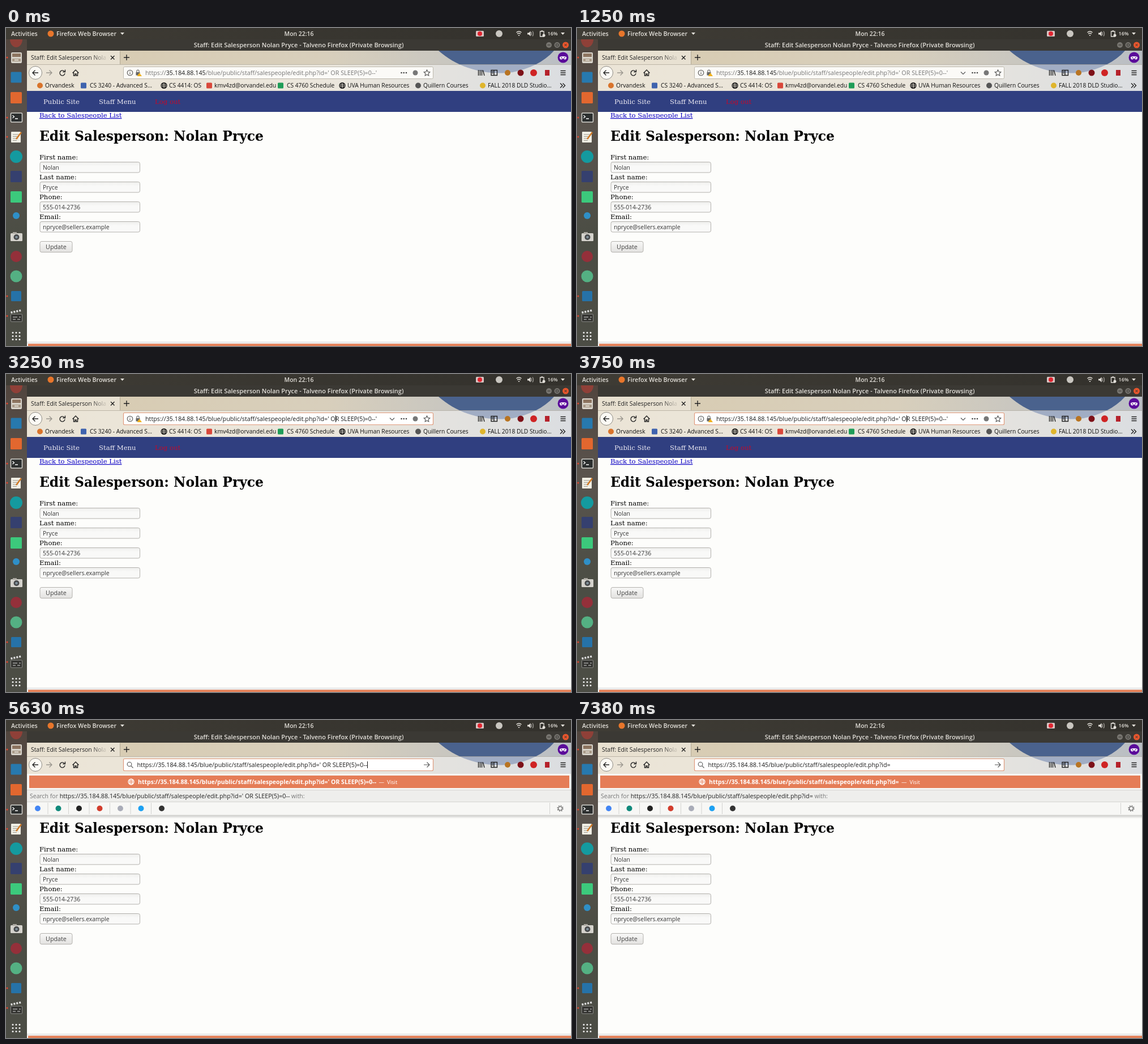
Recreate the animation shown at these times as an HTML page. Size 998x561 px, loop 8 s.

```html
<!DOCTYPE html>
<html lang="en">
<head>
<meta charset="utf-8">
<title>Edit Salesperson</title>
<style>
html, body { margin: 0; width: 100%; height: 100%; overflow: hidden; background: #fdfdfb; }
svg { display: block; width: 100vw; height: 100vh; }
text { white-space: pre; }
.ui { font: 10.75px "Open Sans", "Noto Sans", sans-serif; fill: #1c1c1c; }
.ui .bar { font-weight: 600; font-size: 10.7px; fill: #e3e0da; }
.ui .mark { font-size: 10.25px; fill: #111; }
.ui .field { font-size: 10.4px; fill: #333; }
.page { font: 11.69px "DejaVu Serif", "Noto Serif", serif; fill: #000; }
.page .head { font-size: 23.4px; font-weight: bold; }
.line { fill: none; stroke: #222; stroke-width: 1.4; }
.thin { fill: none; stroke: #555; stroke-width: 1.1; }
.dim { fill: #767676; }
</style>
</head>
<body>
<svg viewBox="0 0 998 561" preserveAspectRatio="none">
  <defs>
    <linearGradient id="dockFill" x2="0" y2="1">
      <stop offset="0" stop-color="#51453e"/><stop offset=".3" stop-color="#5a544e"/>
      <stop offset=".65" stop-color="#4b4d44"/><stop offset="1" stop-color="#4c4d45"/>
    </linearGradient>
    <linearGradient id="topFill">
      <stop offset="0" stop-color="#3f3c35"/><stop offset="1" stop-color="#33312c"/>
    </linearGradient>
    <linearGradient id="sky">
      <stop offset="0" stop-color="#d8cbb0"/><stop offset=".55" stop-color="#d8cfbc"/><stop offset="1" stop-color="#b9bec4"/>
    </linearGradient>
    <linearGradient id="tabFade" gradientUnits="userSpaceOnUse" x1="150" x2="180" y1="0" y2="0">
      <stop offset="0" stop-color="#222"/><stop offset="1" stop-color="#222" stop-opacity="0"/>
    </linearGradient>
    <linearGradient id="inputFill" x2="0" y2="1">
      <stop offset="0" stop-color="#eeeeec"/><stop offset=".4" stop-color="#f9f9f8"/>
    </linearGradient>
    <linearGradient id="buttonFill" x2="0" y2="1">
      <stop offset="0" stop-color="#f8f8f7"/><stop offset="1" stop-color="#e3e2e0"/>
    </linearGradient>
    <linearGradient id="shade" x2="0" y2="1">
      <stop offset="0" stop-color="#000" stop-opacity=".2"/><stop offset="1" stop-color="#000" stop-opacity="0"/>
    </linearGradient>
    <g id="globe" fill="none" stroke="currentColor" stroke-width="1.2">
      <circle r="5"/><ellipse rx="2.2" ry="5"/><path d="M-5 0H5M-4.3-2.5H4.3M-4.3 2.5H4.3" stroke-width=".8"/>
    </g>
  </defs>

  <!-- web page -->
  <rect x="37" y="111" width="961" height="450" fill="#fdfdfb"/>
  <rect x="37" y="553" width="961" height="4" fill="#ebebeb"/>
  <rect x="39" y="557" width="959" height="4" fill="#e5835b"/>
  <rect x="37" y="111" width="961" height="37" fill="#303f80"/>
  <g class="page">
    <g fill="#eceaf2"><text x="66" y="134">Public Site</text><text x="164" y="134">Staff Menu</text></g>
    <text x="263" y="134" fill="#c00a2c">Log out</text>
    <text x="59" y="158" fill="#0c00c4" text-decoration="underline">Back to Salespeople List</text>
    <text class="head" x="59" y="199">Edit Salesperson: Nolan Pryce</text>
  </g>
  <g id="form"></g>
  <g class="ui">
    <rect x="60" y="376.5" width="57" height="19" rx="3" fill="url(#buttonFill)" stroke="#b3b1ad"/>
    <text x="88.5" y="390" text-anchor="middle" fill="#444">Update</text>
  </g>

  <!-- browser frame -->
  <rect x="37" y="40" width="961" height="71" fill="url(#sky)"/>
  <path d="M764 40H968C950 60 925 72 895 78C850 84 800 72 764 40Z" fill="#4a628d"/>
  <rect x="37" y="64" width="961" height="47" fill="#fff" opacity=".48"/>
  <rect x="37" y="40" width="164" height="24" fill="#fff" opacity=".4"/>
  <path d="M201.5 41V64M37 64.5H998" stroke="#8f8778" opacity=".5"/>
  <g class="ui">
    <text x="44" y="56" style="font-size:10.4px" fill="url(#tabFade)">Staff: Edit Salesperson Nola</text>
    <path class="line" d="M185 49l6.500 6.500m0-6.500l-6.500 6.500M208 52h10m-5-5v10"/>
    <circle cx="984" cy="52" r="9.500" fill="#5a0a9a"/>
    <path d="M978 51q6-2 12 0q0 5-3 4.500q-2-.5-3-2.500q-1 2-3 2.500q-3 .5-3-4.500z" fill="#fff"/>
    <g fill="#5a0a9a"><ellipse cx="981.300" cy="52.600" rx="1.300" ry=".9"/><ellipse cx="986.700" cy="52.600" rx="1.300" ry=".9"/></g>

    <circle cx="52" cy="79" r="11.500" fill="#fbf9f4" stroke="#8d8a83"/>
    <path class="line" d="M57 79H47.500M51.500 74.500L47 79l4.500 4.500"/>
    <path class="line" d="M71 79h9.500m-4-4.500l4.500 4.500l-4.500 4.500" opacity=".4"/>
    <path class="line" d="M103 76.500A4.500 4.500 0 1 0 104 80M104.500 73.500v4h-4"/>
    <path class="line" d="M117.500 79.500L123 74l5.500 5.500M119.500 78.500v5.500h2.500v-3h2v3h2.500v-5.500"/>

    <rect id="box" x="207.500" y="68.500" width="547" height="21" rx="2"/>
    <g id="viewIcons">
      <circle class="thin" cx="219" cy="79" r="4.800"/><path class="thin" d="M219 78.300v3.500M219 75.800v1.200"/>
      <path d="M229.500 78h7v5.500h-7z" fill="#666"/><path class="thin" d="M231 78v-2a2 2 0 0 1 4 0v2"/>
      <path d="M235.500 79l4.500 6h-8.500z" fill="#efb11d"/>
      <g fill="#444"><circle cx="698.500" cy="79" r="1.300"/><circle cx="702.700" cy="79" r="1.300"/><circle cx="707" cy="79" r="1.300"/></g>
      <circle cx="723" cy="79" r="4.500" fill="#777"/>
      <path class="thin" d="M743.500 73.800l1.600 3.400l3.700.5l-2.700 2.600l.7 3.700l-3.300-1.800l-3.300 1.800l.7-3.700l-2.700-2.600l3.700-.5z"/>
    </g>
    <path id="chevron" class="thin" d="M678 77.500l4 4l4-4" stroke-width="1.400"/>
    <g id="editIcons">
      <circle class="thin" cx="218" cy="78" r="3.800"/><path class="thin" d="M220.800 80.800l3.700 3.700"/>
      <path class="thin" d="M738 79h10m-4.500-4.500l4.500 4.500l-4.500 4.500"/>
    </g>
    <text id="url" y="83"></text>
    <rect id="caret" y="73" width="1" height="12" fill="#111"/>

    <path class="line" d="M834.500 74v10M837.500 74v10M840.500 74v10M842.500 74.500l2.500 9.500"/>
    <path class="line" d="M857 74.500h10.500v9h-10.500zM862 74.500v9M858.500 77h2M858.500 79.500h2"/>
    <circle cx="886" cy="79" r="5" fill="#b87422"/>
    <circle cx="909" cy="79" r="5.500" fill="#7d1118"/>
    <circle cx="932" cy="79" r="6" fill="#cf2424"/>
    <rect x="952" y="74" width="8" height="10" fill="#b5222b"/>
    <path class="line" d="M979.500 75.500h9M979.500 79h9M979.500 82.500h9"/>
    <g id="marks"></g>
    <path class="line" d="M979 97.500l4 4l-4 4m4.500-8l4 4l-4 4"/>
  </g>

  <!-- suggestions -->
  <g id="popup" class="ui">
    <rect x="37" y="168" width="961" height="6" fill="url(#shade)"/>
    <rect x="37" y="95" width="961" height="73" fill="#f7f7f5"/>
    <rect x="41" y="98" width="954" height="22" fill="#e57d57"/>
    <rect x="37" y="124" width="961" height="20" fill="#eeeeec"/>
    <path d="M37 123.500H998M37 144.500H998M37 168H998" stroke="#d3d3d0"/>
    <use href="#globe" x="221" y="109" color="#fff"/>
    <text x="233" y="113" fill="#fff"><tspan id="visit" font-weight="700" font-size="10.5"></tspan><tspan font-size="9.500" dx="4.500">—  Visit</tspan></text>
    <text x="42" y="138" class="dim"><tspan font-size="10.5">Search for </tspan><tspan id="query" fill="#222"></tspan><tspan font-size="10.300"> with:</tspan></text>
    <g id="engines"></g>
    <path d="M960.500 146v20" stroke="#d3d3d0"/>
    <circle class="thin" cx="979" cy="156" r="3.300"/>
    <circle class="thin" cx="979" cy="156" r="5" stroke-width="1.800" stroke-dasharray="1.960"/>
  </g>

  <!-- desktop -->
  <rect x="37" y="20" width="961" height="20" fill="#3b3934"/>
  <rect width="998" height="20" fill="url(#topFill)"/>
  <rect y="20" width="37" height="541" fill="url(#dockFill)"/>
  <g class="ui">
    <text class="bar" x="9" y="13.500">Activities</text>
    <circle cx="79" cy="10" r="5.500" fill="#e8762b"/>
    <text class="bar" x="89" y="13.500">Firefox Web Browser</text>
    <path d="M202 8h7l-3.500 4zM980 8h7l-3.500 4z" fill="#e3e0da"/>
    <text class="bar" x="517.500" y="13.500" text-anchor="middle" style="font-size:10.400px">Mon 22:16</text>
    <text class="bar" x="517" y="33.500" text-anchor="middle" style="font-size:10.950px">Staff: Edit Salesperson Nolan Pryce - Talveno Firefox (Private Browsing)</text>
    <rect x="830" y="5" width="14" height="10" rx="1.500" fill="#d9c4c2"/><circle cx="837" cy="10" r="4" fill="#e0242f"/>
    <circle cx="871" cy="10" r="6" fill="#c9c6c0"/>
    <g fill="none" stroke="#e3e0da" stroke-width="1.300">
      <path d="M901.500 8q4.500-4 9 0M903 10.500q3-2.500 6 0M904.800 13h2.400"/>
      <path d="M927.500 7q2 3 0 6M930 5.500q3 4.500 0 9" opacity=".6"/>
      <path d="M943.500 6h6.500v9h-6.500zM945.500 4.800h2.500"/>
    </g>
    <path d="M921 8.500h2.500l3-3v9l-3-3h-2.500z" fill="#e3e0da"/>
    <circle cx="950" cy="13" r="2.500" fill="#e3e0da"/>
    <text class="bar" x="956.500" y="13" style="font-size:9px">16%</text>
    <circle cx="959" cy="30" r="5" fill="#777570"/><circle cx="973.500" cy="30" r="5" fill="#777570"/><circle cx="988.500" cy="30" r="5.500" fill="#e9562d"/>
    <path d="M956.500 30h5M971.500 28h4v4h-4zM986.500 28l4 4m0-4l-4 4" fill="none" stroke="#35332f"/>
  </g>
  <path d="M7 20H29A11 14 0 0 1 7 20Z" fill="#8f4038"/>
  <g id="dock"></g>
  <g>
    <rect x="9" y="43" width="19" height="19" rx="2" fill="#d9d4cb"/><rect x="11" y="45" width="15" height="6" fill="#8d7460"/>
    <rect x="11" y="54" width="15" height="5" fill="#a99a88"/><path d="M15 56.500h7" stroke="#f1ede6" stroke-width="1.500"/>
    <rect x="8.500" y="150" width="20" height="16" rx="1.500" fill="#2c2f2f" stroke="#d5d5d0" stroke-width="1.500"/>
    <path d="M11.500 154l3 2.500l-3 2.500M16 160h5" fill="none" stroke="#fff" stroke-width="1.300"/>
    <rect x="9" y="183" width="17" height="19" rx="1" fill="#f1efe5"/>
    <path d="M12 188h11M12 191.500h11M12 195h9M12 198.500h7" stroke="#9a978e"/>
    <path d="M27 184l-9 12" stroke="#d27a25" stroke-width="2.500"/>
    <rect x="8" y="362" width="21" height="14" rx="1.500" fill="#d4d2cc"/><rect x="12" y="360" width="7" height="3" fill="#aaa7a0"/>
    <circle cx="18.500" cy="369" r="5" fill="#47494b"/><circle cx="18.500" cy="369" r="2.300" fill="#809099"/>
    <rect x="8.500" y="505" width="20" height="13" rx="1" fill="#32322f" stroke="#aaa" stroke-width=".7"/>
    <path d="M8.500 502l19-4" stroke="#ddd" stroke-width="3.500" stroke-dasharray="3 2"/>
    <path d="M12 510h8m3 0h3M12 514h5m3 0h5" stroke="#ddd"/>
  </g>
</svg>
<script>
const NS = "http://www.w3.org/2000/svg";
const $ = id => document.getElementById(id);

function add(parent, tag, attrs, label) {
  const el = document.createElementNS(NS, tag);
  for (const k in attrs) el.setAttribute(k, attrs[k]);
  if (label) el.textContent = label;
  return parent.appendChild(el);
}
function disc(parent, cx, cy, r, fill) { add(parent, "circle", { cx, cy, r, fill }); }
function tile(parent, cx, cy, s, fill) {
  add(parent, "rect", { x: cx - s / 2, y: cy - s / 2, width: s, height: s, rx: 1.5, fill });
}

// form fields
[["First name:", "Nolan"], ["Last name:", "Pryce"], ["Phone:", "555-014-2736"], ["Email:", "npryce@sellers.example"]]
  .forEach(([label, value], i) => {
    const y = 232 + i * 35, g = $("form");
    const page = add(g, "g", { class: "page" }), ui = add(g, "g", { class: "ui" });
    add(page, "text", { x: 59, y }, label);
    add(ui, "rect", { x: 60, y: y + 4.5, width: 176.5, height: 18.5, rx: 3, fill: "url(#inputFill)", stroke: "#b3b1ad" });
    add(ui, "text", { class: "field", x: 65, y: y + 17.5 }, value);
  });

// bookmarks: icon x, text x, label, shape, colour
[
  [60, 69, "Orvandesk", disc, "#d9742b"],
  [137, 148, "CS 3240 - Advanced S…", tile, "#3f63ae"],
  [279, 288, "CS 4414: OS"],
  [359, 368, "kmv4zd@orvandel.edu", tile, "#d9483b"],
  [485, 496, "CS 4760 Schedule", tile, "#1f9d58"],
  [594, 603, "UVA Human Resources"],
  [728, 737, "Quillern Courses", disc, "#555"],
  [842, 851, "FALL 2018 DLD Studio…", disc, "#dfb52c"]
].forEach(([ix, tx, label, shape, color]) => {
  const g = $("marks");
  if (shape) shape(g, ix, 101.5, shape === disc ? 5 : 10, color);
  else add(g, "use", { href: "#globe", x: ix, y: 101.5, color: "#111" });
  add(g, "text", { class: "mark", x: tx, y: 105 }, label);
});

// search engines
["#4285f4", "#10897b", "#222", "#d23c2c", "#a9acb8", "#1da1f2", "#333"].forEach((color, i) => {
  const x = 56 + i * 36.5;
  disc($("engines"), x, 156, 5, color);
  if (i < 6) add($("engines"), "path", { d: `M${x + 18} 146v20`, stroke: "#d3d3d0" });
});

// dock
const dock = $("dock");
[
  [87, tile, 19, "#2779ae"], [123, tile, 20, "#e2672f"], [227, disc, 11, "#149a9f"],
  [262, tile, 20, "#35406f"], [298, tile, 20, "#3cc97c"], [331, disc, 6, "#2f8fc7"],
  [403, disc, 10, "#94303a"], [438, disc, 10.5, "#54b083"], [473, tile, 18, "#2672a8"]
].forEach(([y, shape, size, color]) => shape(dock, 18, y, size, color));
[52, 158, 192, 473, 508].forEach(y => disc(dock, 2, y, 1.5, "#e5452f"));
for (let i = 0; i < 9; i++) tile(dock, 12 + i % 3 * 6, 537.5 + Math.floor(i / 3) * 6, 3, "#eee");

// address bar
const scheme = "https://", host = "35.184.88.145", path = "/blue/public/staff/salespeople/edit.php?id=";
const base = scheme + host + path, tail = "' OR SLEEP(5)=0--'";
const LOOP = 8000, HOVER = 880, FOCUS = 1750, EDIT = 5630;
// [time, characters of the tail left]
const LEFT = [[0, 18], [5630, 17], [6000, 16], [6130, 14], [6250, 12], [6380, 10], [6500, 8],
  [6630, 6], [6750, 4], [6880, 3], [7000, 2], [7130, 1], [7250, 0]];
// [time, caret place in the tail], -1 is hidden, 99 is the end
const CARET = [[0, -1], [1750, 3], [2500, -1], [3250, 3], [4250, 99], [5000, -1], [5250, 99], [7380, -1]];

const at = (steps, t) => steps.filter(s => s[0] <= t).pop()[1];
const show = (id, on) => $(id).style.display = on ? "" : "none";
let last = "";

function draw(t) {
  const left = at(LEFT, t), caret = at(CARET, t);
  const hover = t >= HOVER, focus = t >= FOCUS, edit = t >= EDIT;
  const key = [left, caret, hover, focus, edit].join();
  if (key === last) return;
  last = key;

  const end = tail.slice(0, left), url = $("url"), x = edit ? 231.5 : 246;
  const ink = "#1c1c1c", soft = focus ? ink : "#767676";
  url.textContent = "";
  url.setAttribute("x", x);
  add(url, "tspan", { fill: soft }, scheme);
  add(url, "tspan", { fill: ink }, host);
  add(url, "tspan", { fill: soft }, path + end);
  $("visit").textContent = $("query").textContent = base + end;

  const box = $("box");
  box.setAttribute("fill", focus ? "#fff" : "#fbfaf7");
  box.setAttribute("stroke", focus ? "#e09a7c" : "#bdb8ad");
  box.setAttribute("stroke-width", focus ? 1.2 : 1);
  show("viewIcons", !edit);
  show("chevron", hover && !edit);
  show("editIcons", edit);
  show("popup", edit);
  show("caret", caret >= 0);
  if (caret >= 0) {
    const n = base.length + Math.min(caret, left);
    $("caret").setAttribute("x", Math.round(x + url.getSubStringLength(0, n)));
  }
}

const start = performance.now();
function tick(now) {
  draw(Math.max(0, now - start) % LOOP);
  requestAnimationFrame(tick);
}
draw(0);
requestAnimationFrame(tick);
</script>
</body>
</html>
```
